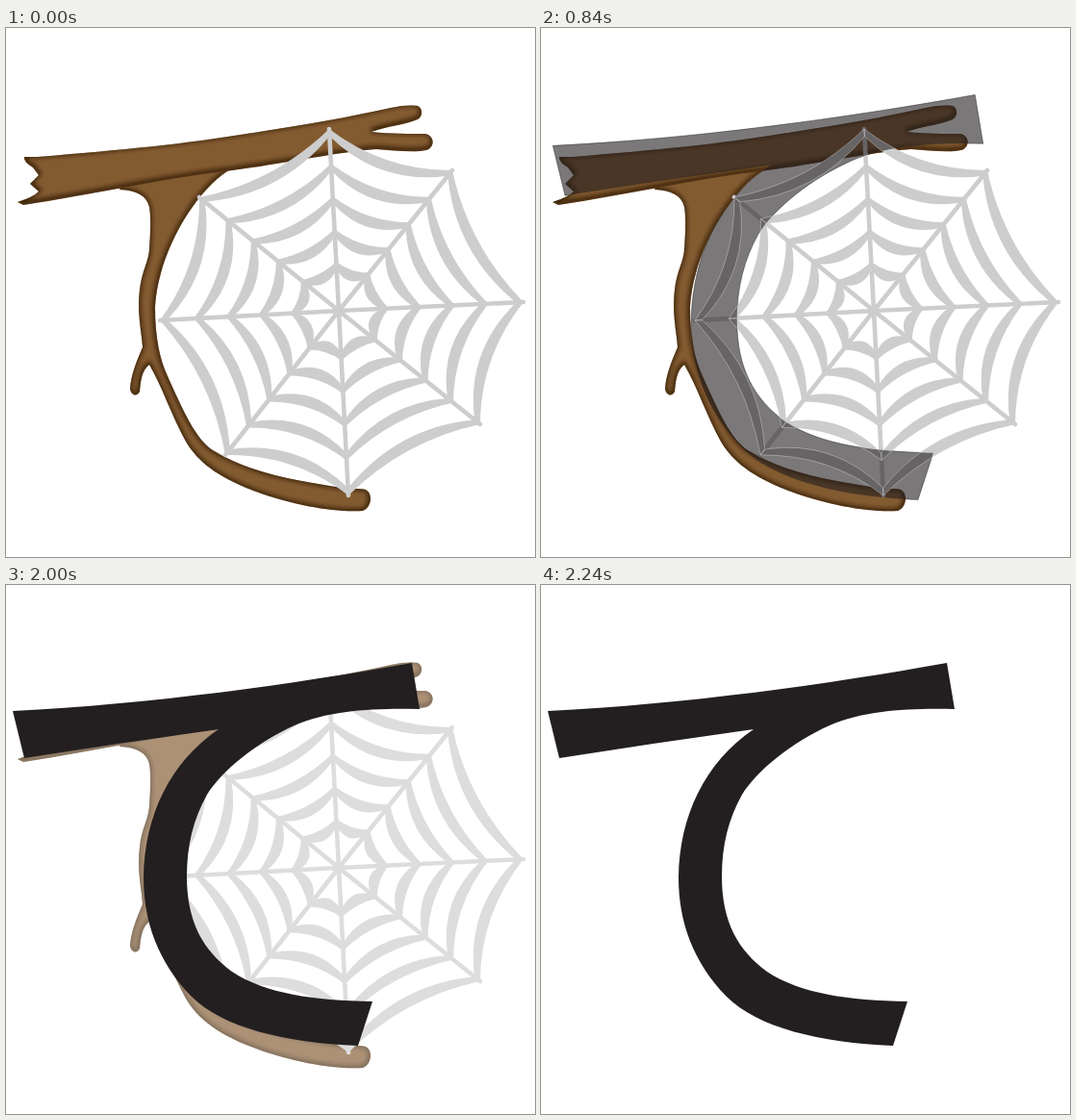
Write an HTML page that moves like this. It is 550x550 px and loops after 3.04 s.

```html
<!DOCTYPE html>
<html lang="en">
<head>
<meta charset="utf-8">
<title>Branch, web and letter</title>
<style>
  html, body { margin: 0; width: 100%; height: 100%; overflow: hidden; background: #fff; }
  svg { display: block; width: 100vw; height: 100vh; }
  .wood { fill: #835b30; }
  .bevel { fill: none; stroke: #2b1a08; stroke-width: 5; stroke-opacity: .8; filter: url(#soft); }
  #web path { fill: #cdcdcd; }
  #web #spokes { fill: none; stroke: #cdcdcd; stroke-width: 4.6; stroke-linecap: round; }
  #edges { fill: none; stroke-width: .7; }
</style>
</head>
<body>
<svg viewBox="0 0 550 550">
  <defs>
    <filter id="soft" x="-10%" y="-10%" width="120%" height="120%"><feGaussianBlur stdDeviation="2"/></filter>
    <path id="bough" d="M19 134 L33 134 C120 127 190 120 250 110 C310 101 360 92 400 83
      C412 80 424 80 428 81 C434 84 433 92 428 95 C414 101 396 102 380 108
      C400 110 420 110 436 110 C446 112 446 124 437 127 C424 130 402 127 385 126
      C350 128 290 141 228 149 C160 157 90 173 18 184 L12 181 Q28 176 34 170
      L25 162 L34 153 L28 145 Q18 139 19 134Z"/>
    <path id="stem" d="M130 140 L245 140 L230 149 C195 172 158 235 155 290
      C155 322 160 345 168 362 C185 400 198 428 215 439 C255 464 310 472 350 478
      C362 480 368 478 374 480 C382 484 380 499 371 502 C345 504 300 497 260 482
      C222 468 200 452 187 430 C172 403 162 372 149 350 C141 356 140 368 139 378
      C136 384 130 382 129 375 C130 360 136 346 142 332 C141 315 136 298 139 272
      C141 253 148 244 149 230 C150 214 151 198 149 186 C146 174 136 169 118 168Z"/>
    <path id="letter" d="M7 131 C150 124 300 103 422 81 L430 129 C383 128 337 130 300 146
      C262 163 225 192 209 218 C195 243 188 270 188 303 C188 350 205 380 235 402
      C270 425 320 432 381 433 L366 479 C290 476 225 460 193 428 C158 392 143 350 143 304
      C144 240 170 185 221 150 Q120 164 19 180Z"/>
    <clipPath id="inBough"><use href="#bough"/></clipPath>
    <clipPath id="inStem"><use href="#stem"/></clipPath>
    <clipPath id="inLetter"><use href="#letter" class="move"/></clipPath>
  </defs>

  <use id="rim" href="#letter" class="move" fill="none" stroke="#000" stroke-width=".9"/>
  <g id="scene">
    <use href="#stem" class="wood"/>
    <g clip-path="url(#inStem)"><use href="#stem" class="bevel" x="-.5" y="-.5"/></g>
    <use href="#bough" class="wood"/>
    <g clip-path="url(#inBough)"><use href="#bough" class="bevel" y="-1.5"/></g>
    <g id="web"><path id="bands"/><path id="spokes"/></g>
  </g>
  <use id="ink" href="#letter" class="move" fill="#231f20"/>
  <g clip-path="url(#inLetter)"><path id="edges"/></g>
</svg>
<script>
const LOOP = 3040, STEP = 40;
const byId = id => document.getElementById(id);
const hub = [346, 294];
const tips = [[336, 105], [464, 148], [538, 285], [493, 412],
              [356, 486], [228, 444], [160, 304], [201, 176]];

// Point at share f of the way from the hub to p.
const along = (p, f) => hub.map((h, i) => (h + (p[i] - h) * f).toFixed(1)).join(' ');

function band(a, b, f) {
  const mid = [(a[0] + b[0]) / 2, (a[1] + b[1]) / 2];
  const g = f - .04;
  return `M${along(a, f)}Q${along(mid, .87 * f)} ${along(b, f)}` +
         `L${along(b, g)}Q${along(mid, .87 * f - .09)} ${along(a, g)}Z`;
}

const bands = tips.map((a, i) =>
  [1, .81, .63, .45, .27].map(f => band(a, tips[(i + 1) % tips.length], f)).join('')).join('');
byId('bands').setAttribute('d', bands);
byId('edges').setAttribute('d', bands);
byId('spokes').setAttribute('d', tips.map(p => `M${hub}L${p}`).join(''));

const movers = document.querySelectorAll('.move');
const stepsFrom = (t, start, max) =>
  Math.max(0, Math.min(max, Math.floor((t - start) / STEP) + 1));

function draw(t) {
  const n = stepsFrom(t, 640, 10);
  const left = 10 - n;
  const place = `translate(${1.23 * left} ${-4.05 * left}) scale(${1 + .0144 * left})`;
  movers.forEach(m => m.setAttribute('transform', place));

  const line = n ? left / 9 : 0;
  const grey = Math.min(255, Math.max(0, n - 1) * 51);
  byId('ink').setAttribute('opacity', n / 10);
  byId('rim').setAttribute('opacity', line);
  byId('edges').setAttribute('opacity', line);
  byId('edges').setAttribute('stroke', `rgb(${grey},${grey},${grey})`);
  byId('scene').setAttribute('opacity', 1 - stepsFrom(t, 1920, 9) / 9);
}

const begin = performance.now();
function tick() {
  draw((performance.now() - begin) % LOOP);
  requestAnimationFrame(tick);
}
tick();
</script>
</body>
</html>
```
